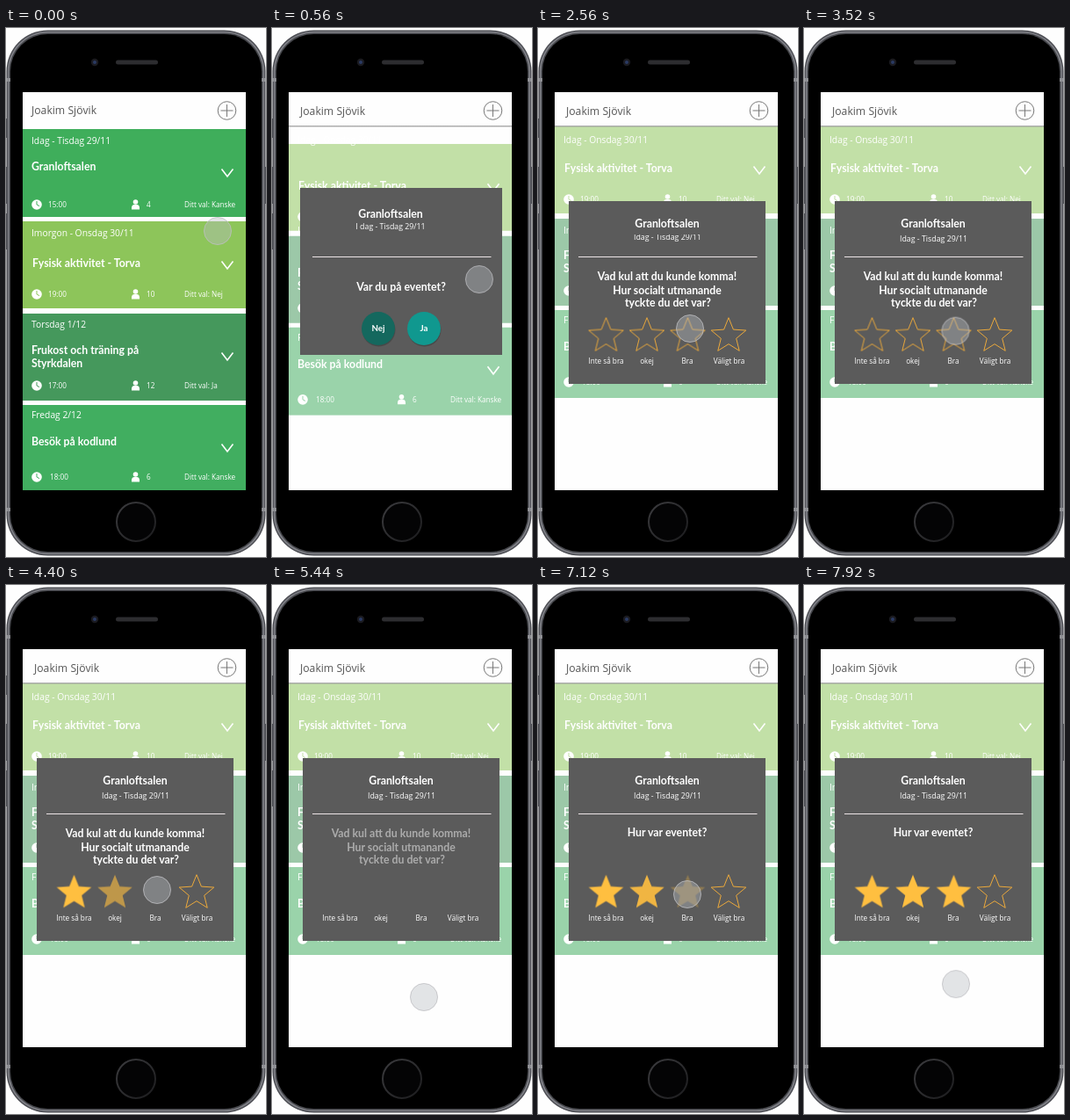
Write an HTML page that moves like this. It is 296x602 px and loops after 8000 ms.

```html
<!DOCTYPE html>
<html lang="sv">
<head>
<meta charset="utf-8">
<title>Eventapp</title>
<style>
html, body { margin: 0; width: 100%; height: 100%; overflow: hidden; background: #fefefe; }
svg { display: block; width: 100vw; height: 100vh; }
text { font: 8.2px "Open Sans", sans-serif; fill: #fff; }
.date { font-size: 10.3px; }
.title { font: 700 12.3px Lato, sans-serif; }
.mid { text-anchor: middle; }
.sub { font-size: 8.8px; }
.name { font-size: 12.2px; fill: #555; }
.btn { font: 700 9.7px Lato, sans-serif; }
.thin { fill: none; stroke: #fff; stroke-width: 1.6; }

.anim { animation: 8s linear infinite; }
.list { animation-name: list; }
.first { animation-name: first; }
.old { animation-name: old; }
.new { animation-name: new; }
.veil { animation-name: veil; }
.head1 { animation-name: head1; }
.head2 { animation-name: head2; }
.dialog { animation-name: dialog; }
.box { animation-name: box; animation-timing-function: ease-in-out; }
.intro { animation-name: intro; animation-timing-function: ease-in-out; }
.ask1 { animation-name: ask1; }
.ask2 { animation-name: ask2; }
.ask3 { animation-name: ask3; }
.rate { animation-name: rate; }
.stars { animation-name: stars; }
.drop { animation-name: drop; }
.full { opacity: 0; fill: #ffbf40; animation-name: full; }
.line { fill: none; stroke: #eba93c; }
.line.anim { animation-name: line; }
.s2 { animation-delay: .16s; }
.s3 { animation-delay: .32s; }
.touch { animation-name: touch; animation-timing-function: ease-in-out; }

@keyframes list {
  0%, 3% { transform: none; animation-timing-function: ease-in; }
  7% { transform: translateY(-88px); animation-timing-function: ease-out; }
  10%, 100% { transform: translateY(-108px); }
}
@keyframes first { 0%, 1% { opacity: 1; } 4%, 100% { opacity: 0; } }
@keyframes old { 0%, 2% { opacity: 1; } 5%, 100% { opacity: 0; } }
@keyframes new { 0%, 4% { opacity: 0; } 7%, 100% { opacity: 1; } }
@keyframes veil { 0%, 2% { opacity: 0; } 6%, 100% { opacity: .47; } }
@keyframes head1 { 0%, 2% { opacity: 1; } 2.01%, 100% { opacity: 0; } }
@keyframes head2 { 0%, 2% { opacity: 0; } 2.01%, 100% { opacity: 1; } }
@keyframes dialog { 0%, 3% { opacity: 0; } 6%, 100% { opacity: 1; } }
@keyframes box {
  0%, 7% { x: 32px; y: 182px; width: 230px; height: 190px; }
  10%, 100% { x: 35px; y: 197px; width: 224px; height: 208px; }
}
@keyframes intro { 0%, 7% { transform: translate(-12px, -11px); } 10%, 100% { transform: none; } }
@keyframes ask1 { 0%, 22% { opacity: 1; } 25%, 100% { opacity: 0; } }
@keyframes ask2 { 0%, 25% { opacity: 0; } 28%, 67% { opacity: 1; } 69%, 100% { opacity: 0; } }
@keyframes ask3 { 0%, 69% { opacity: 0; } 72%, 100% { opacity: 1; } }
@keyframes rate { 0%, 25% { opacity: 0; } 28%, 100% { opacity: 1; } }
@keyframes stars { 0%, 64.5% { opacity: 1; } 66.5%, 70.5% { opacity: 0; } 72%, 100% { opacity: 1; } }
@keyframes drop { 0%, 28% { transform: translateY(-5px); } 34%, 100% { transform: none; } }
@keyframes full {
  0%, 51% { opacity: 0; }
  54.3%, 66.5% { opacity: 1; }
  66.51%, 84% { opacity: 0; }
  87.3%, 100% { opacity: 1; }
}
@keyframes line {
  0%, 49.5% { opacity: 1; }
  50.8%, 66.5% { opacity: 0; }
  66.51%, 82.5% { opacity: 1; }
  83.8%, 100% { opacity: 0; }
}
@keyframes touch {
  0% { transform: translate(241px, 231px); }
  7% { transform: translate(236px, 286px); animation-timing-function: linear; }
  16% { transform: translate(183px, 328px); animation-timing-function: ease-out; }
  19% { transform: translate(174px, 341px); }
  32% { transform: translate(173px, 342px); }
  55%, 60% { transform: translate(172px, 347px); }
  66%, 68% { transform: translate(173px, 469px); }
  77%, 80% { transform: translate(170px, 352px); }
  94% { transform: translate(170px, 352px); animation-timing-function: ease-out; }
  99% { transform: translate(173px, 454px); animation-timing-function: linear; }
  100% { transform: translate(173px, 467px); }
}
</style>
</head>
<body>
<svg viewBox="0 0 296 602" preserveAspectRatio="none">
  <defs>
    <linearGradient id="shade" x2="0" y2="1">
      <stop offset="0" stop-color="#999"/>
      <stop offset="1" stop-color="#999" stop-opacity="0"/>
    </linearGradient>
    <linearGradient id="ring" x2="1" y2="1">
      <stop offset="0" stop-color="#3c3c3f"/>
      <stop offset="1" stop-color="#1c1c1e"/>
    </linearGradient>
    <clipPath id="screen"><path d="M19 73H273V526H19Z"/></clipPath>
    <clipPath id="under"><path d="M36 235H258V256H36Z"/></clipPath>
    <path id="chevron" class="thin" d="M-6.5-4.5 0 4 6.5-4.5"/>
    <g id="icons">
      <circle cx="35" r="5.8" fill="#fff"/>
      <path d="M35-4V0L38 1.6" fill="none" stroke="var(--c)"/>
      <circle cx="147.5" cy="-3" r="2.8" fill="#fff"/>
      <path d="M143 5.5V3Q143.500 0 146 0H149Q151.500 0 152 3V5.500Z" fill="#fff"/>
    </g>
    <path id="star"/>
  </defs>

  <!-- phone -->
  <path d="M0 103H3V125H0ZM0 158H3V200H0ZM0 211H3V252H0ZM293 158H296V200H293Z" fill="#606167"/>
  <rect x=".5" y="2.5" width="295" height="598" rx="47" fill="#4d4e54"/>
  <rect x="2" y="4" width="292" height="595" rx="45.500" fill="#818288"/>
  <rect x="3.500" y="5.500" width="289" height="592" rx="44" fill="#47484d"/>
  <path d="M1 57H5V61H1ZM291 57H295V61H291ZM1 546H5V550H1ZM291 546H295V550H291Z" fill="#8e8f94"/>
  <rect x="5" y="7" width="286" height="589" rx="42.500"/>
  <circle cx="101" cy="39" r="4.200" fill="#1b1b20"/>
  <circle cx="101" cy="39" r="2" fill="#2a3a63"/>
  <rect x="125" y="36.500" width="48" height="5" rx="2.500" fill="#2d2d30"/>
  <circle cx="148" cy="562" r="22" fill="#040405" stroke="url(#ring)" stroke-width="2"/>

  <g clip-path="url(#screen)">
    <path d="M19 73H273V526H19Z" fill="#fefefe"/>
    <g class="anim list">
      <g class="anim first" style="--c:#3fae5b">
        <path d="M19 115H273V215H19Z" fill="var(--c)"/>
        <text class="date" x="29" y="132">Idag - Tisdag 29/11</text>
        <text class="title" x="29" y="162">Granloftsalen</text>
        <use href="#chevron" x="252" y="165"/>
        <use href="#icons" y="201"/>
        <text x="48" y="204">15:00</text><text x="160" y="204">4</text><text x="203" y="204">Ditt val: Kanske</text>
      </g>
      <g style="--c:#8dc55a">
        <path d="M19 220H273V319H19Z" fill="var(--c)"/>
        <text class="date anim old" x="29" y="237">Imorgon - Onsdag 30/11</text>
        <text class="title" x="30" y="272">Fysisk aktivitet - Torva</text>
        <use href="#chevron" x="252" y="270"/>
        <use href="#icons" y="303"/>
        <text x="48" y="306">19:00</text><text x="160" y="306">10</text><text x="203" y="306">Ditt val: Nej</text>
      </g>
      <g style="--c:#45985c">
        <path d="M19 325H273V424H19Z" fill="var(--c)"/>
        <text class="date anim old" x="29" y="341">Torsdag 1/12</text>
        <text class="title" x="29" y="371">Frukost och träning på</text>
        <text class="title" x="29" y="386">Styrkdalen</text>
        <use href="#chevron" x="252" y="374"/>
        <use href="#icons" y="407"/>
        <text x="48" y="410">17:00</text><text x="160" y="410">12</text><text x="203" y="410">Ditt val: Ja</text>
      </g>
      <g style="--c:#41ae60">
        <path d="M19 429H273V529H19Z" fill="var(--c)"/>
        <text class="date" x="29" y="444">Fredag 2/12</text>
        <text class="title" x="29" y="475">Besök på kodlund</text>
        <use href="#chevron" x="252" y="478"/>
        <use href="#icons" y="511"/>
        <text x="50" y="514">18:00</text><text x="160" y="514">6</text><text x="203" y="514">Ditt val: Kanske</text>
      </g>
    </g>
    <g class="anim new">
      <text class="date" x="29" y="131">Idag - Onsdag 30/11</text>
      <text class="date" x="29" y="234">Imorgon - Torsdag 1/12</text>
    </g>
    <path class="anim veil" d="M19 109H273V526H19Z" fill="#fff"/>

    <path d="M19 73H273V111H19Z" fill="#fefefe"/>
    <text class="name anim head1" x="29" y="98">Joakim Sjövik</text>
    <g class="anim head2">
      <path d="M19 111H273V113.500H19Z" fill="url(#shade)"/>
      <text class="name" x="32" y="98.500">Joakim Sjövik</text>
    </g>
    <g fill="none" stroke="#777">
      <circle cx="251.500" cy="94" r="10.300"/>
      <path d="M244.500 94H258.500M251.500 87V101"/>
    </g>

    <!-- dialog -->
    <g class="anim dialog">
      <rect class="anim box" fill="#5b5b5b"/>
      <g class="anim intro">
        <text class="title mid" x="147" y="227">Granloftsalen</text>
        <text class="sub mid anim ask1" x="147" y="240">I dag - Tisdag 29/11</text>
      </g>
      <path d="M46 260.500H249.500" stroke="#ece4e6"/>
      <g class="anim ask1">
        <text class="title mid" x="147" y="298.500">Var du på eventet?</text>
        <circle cx="121.500" cy="343.500" r="19" fill="#000" opacity=".2"/>
        <circle cx="173.500" cy="343.500" r="19" fill="#000" opacity=".2"/>
        <circle cx="121" cy="342" r="19" fill="#14685e"/>
        <circle cx="173" cy="342" r="19" fill="#10988f"/>
        <text class="btn mid" x="121" y="345">Nej</text>
        <text class="btn mid" x="173" y="345">Ja</text>
      </g>
      <g class="anim rate">
        <g clip-path="url(#under)">
          <text class="sub mid anim drop" x="147.500" y="243">Idag - Tisdag 29/11</text>
        </g>
        <g class="anim stars">
          <use href="#star" class="anim line" x="77.500" y="350.500"/>
          <use href="#star" class="anim line s2" x="124" y="350.500"/>
          <use href="#star" class="anim line s3" x="170.500" y="350.500"/>
          <use href="#star" class="line" x="217" y="350.500"/>
          <use href="#star" class="anim full" x="77.500" y="350.500"/>
          <use href="#star" class="anim full s2" x="124" y="350.500"/>
          <use href="#star" class="anim full s3" x="170.500" y="350.500"/>
        </g>
        <text class="mid" x="77.500" y="382">Inte så bra</text>
        <text class="mid" x="124" y="382">okej</text>
        <text class="mid" x="170" y="382">Bra</text>
        <text class="mid" x="217.500" y="382">Väligt bra</text>
      </g>
      <g class="anim ask2">
        <text class="title mid" x="147" y="287">Vad kul att du kunde komma!</text>
        <text class="title mid" x="147" y="302.500">Hur socialt utmanande</text>
        <text class="title mid" x="148" y="317">tyckte du det var?</text>
      </g>
      <text class="title mid anim ask3" x="147" y="286">Hur var eventet?</text>
    </g>

    <circle class="anim touch" r="15.500" fill="#babec2" fill-opacity=".4" stroke="#bebec2" stroke-opacity=".8"/>
  </g>
</svg>
<script>
// Five-pointed star: outer radius r, inner radius r * k
function star(r, k) {
  const pts = [];
  for (let i = 0; i < 10; i++) {
    const a = i * Math.PI / 5, d = i % 2 ? r * k : r;
    pts.push((d * Math.sin(a)).toFixed(2) + " " + (-d * Math.cos(a)).toFixed(2));
  }
  return "M" + pts.join("L") + "Z";
}
document.getElementById("star").setAttribute("d", star(20.8, .44));
</script>
</body>
</html>
```
